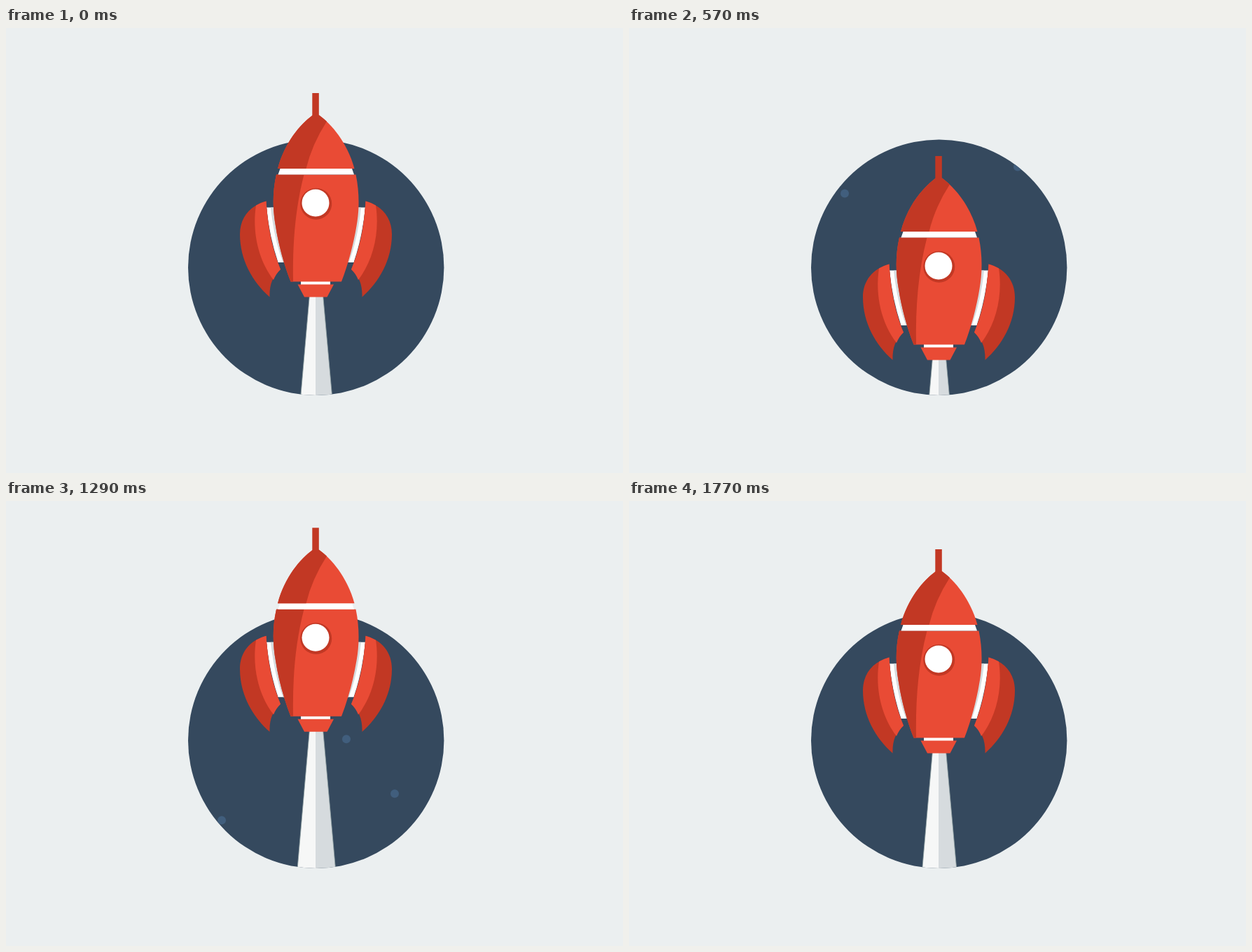
An HTML page that plays this animation: 881 by 636 pixels, repeating every 1.83 s.

```html
<!DOCTYPE html>
<html lang="en">
<head>
<meta charset="utf-8">
<title>Rocket</title>
<style>
  html, body { margin: 0; width: 100%; height: 100%; overflow: hidden; background: #ebeff0; }
  svg { display: block; width: 881px; height: 636px; }
  .red { fill: #e94b35; }
  .dark { fill: #c23824; }
  .white { fill: #fff; }
  .grey { fill: #d6dbde; }
  .star { fill: #415e7d; }
</style>
</head>
<body>
<svg viewBox="0 0 881 636">
  <defs>
    <clipPath id="porthole"><circle cx="442.7" cy="342.2" r="182.7"/></clipPath>
    <g id="fin">
      <path class="white" d="M372 163.5H386L401 242H388.5Q376 205 372 163.5Z"/>
      <path class="grey" d="M378 163.5H386L401 242H395.5Q383 210 378 163.5Z"/>
      <path class="dark" d="M371.5 154.5C348 161 334 178 334 202C334 238 352 270 376.5 291.5C376 273 381 262 392 252C381 225 374 195 371.5 154.5Z"/>
      <path class="red" d="M371.5 154.5Q364 156.5 357 160.5C351 200 361 240 382 267Q386 257.5 392 252C381 225 374 195 371.5 154.5Z"/>
    </g>
  </defs>

  <g clip-path="url(#porthole)">
    <rect x="250" y="150" width="385" height="385" fill="#35495e"/>
    <g id="stars"></g>
    <g id="trail">
      <path d="M433.5 288H442V531H412.3Z" fill="#f6f7f7"/>
      <path class="grey" d="M442 288H452.5L474.4 531H442Z"/>
      <path d="M433.5 288L412.3 531M452.5 288L474.4 531" stroke="#95a5a6" stroke-width=".8" fill="none"/>
    </g>
  </g>

  <g id="rocket">
    <use href="#fin"/>
    <use href="#fin" transform="translate(885 0) scale(-1 1)"/>
    <!-- nozzle -->
    <rect class="white" x="421" y="269" width="42" height="5"/>
    <path class="red" d="M416.5 273.5H468L458.5 291.5H426Z"/>
    <!-- hull -->
    <path class="red" d="M386 116.5C380 143 381 168 385 190C389 217 397 245 406.5 269.5H479C488.5 245 496 217 500.5 190C504.5 168 505 143 499.5 116.5Z"/>
    <path class="dark" d="M386 116.5C380 143 381 168 385 190C389 217 397 245 406.5 269.5H410C409 215 413 165 425.5 116.5Z"/>
    <path class="white" d="M391.5 108H494L497 116.5H388.5Z"/>
    <!-- nose -->
    <path class="red" d="M438 31.5C420 45 398 70 388 108H497.5C487 70 465 45 447 31.5Z"/>
    <path class="dark" d="M438 31.5C420 45 398 70 388 108H428.5Q437 73 458 40.5Q453 36 447 31.5Z"/>
    <rect class="dark" x="437.3" y="0" width="9.5" height="34"/>
    <!-- window -->
    <circle class="dark" cx="442.7" cy="158.2" r="22.5"/>
    <circle class="white" cx="442" cy="157" r="19.5"/>
  </g>
</svg>
<script>
const LOOP = 1830;
// height of the antenna tip over time: [ms, y]
const path = [
  [0, 93], [330, 194], [420, 200], [570, 183], [870, 119.5], [1110, 69],
  [1470, 13.5], [1530, 6.5], [1590, 4.2], [1650, 15], [1770, 69]
];
// x, y at time zero, px per ms
const stars = [[308, 62.7, 0.305], [555, 24.7, 0.305], [486, -253.2, 0.46]];

const byId = id => document.getElementById(id);
const rocket = byId("rocket"), trail = byId("trail");

const dots = stars.map(([x]) => {
  const dot = document.createElementNS("http://www.w3.org/2000/svg", "circle");
  dot.setAttribute("class", "star");
  dot.setAttribute("cx", x);
  dot.setAttribute("r", 6);
  return byId("stars").appendChild(dot);
});

// knot lookup that wraps around the loop
function knot(i) {
  const n = path.length, turn = Math.floor(i / n), [t, y] = path[i - turn * n];
  return [t + turn * LOOP, y];
}

function slope(i) {
  const [a, ya] = knot(i - 1), [b, yb] = knot(i), [c, yc] = knot(i + 1);
  return ((yb - ya) / (b - a) * (c - b) + (yc - yb) / (c - b) * (b - a)) / (c - a);
}

// smooth cubic through the knots
function heightAt(t) {
  let i = 0;
  while (knot(i + 1)[0] <= t) i++;
  const [a, ya] = knot(i), [b, yb] = knot(i + 1);
  const d = b - a, u = (t - a) / d, v = 1 - u;
  return v * v * (1 + 2 * u) * ya + u * u * (1 + 2 * v) * yb
    + d * u * v * (v * slope(i) - u * slope(i + 1));
}

// the picture holds for 30 ms at first, then for 60 ms
function hold(t) {
  return t < 210 ? Math.floor(t / 30) * 30 : 210 + Math.floor((t - 210) / 60) * 60;
}

function draw(now) {
  const t = hold(now % LOOP);
  const shift = `translate(0 ${heightAt(t).toFixed(2)})`;
  rocket.setAttribute("transform", shift);
  trail.setAttribute("transform", shift);
  stars.forEach(([, y, speed], i) => dots[i].setAttribute("cy", y + speed * t));
}

const start = performance.now();
function tick() {
  draw(performance.now() - start);
  requestAnimationFrame(tick);
}
tick();
</script>
</body>
</html>
```
